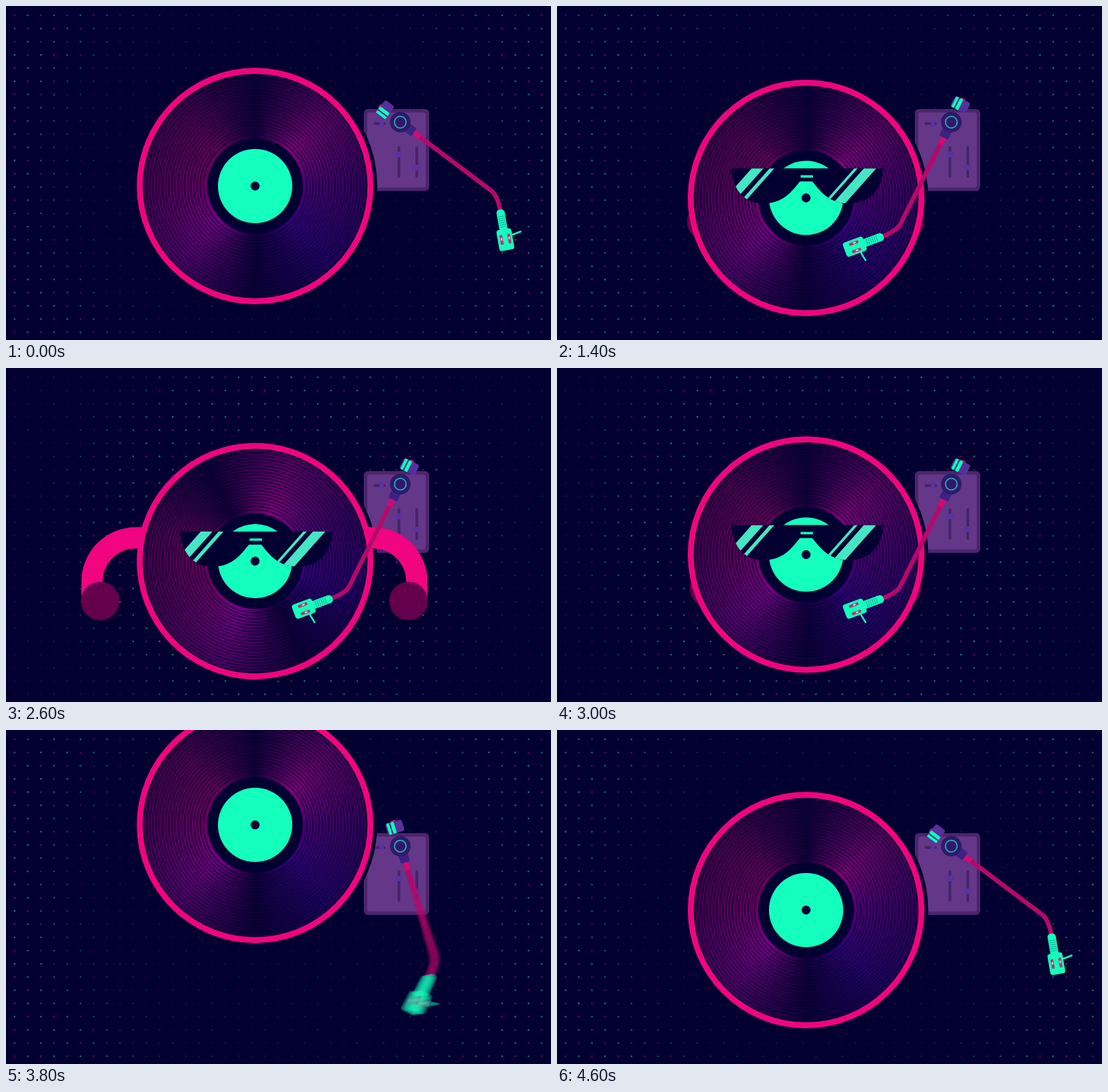
Animation of 792x486 px, one loop 4800 ms. Source, as an HTML page with a canvas:

```html
<!DOCTYPE html>
<html lang="en">
<head>
<meta charset="utf-8">
<title>Dancing record</title>
<style>
html, body { margin: 0; width: 100%; height: 100%; overflow: hidden; background: #020030; }
canvas { display: block; }
</style>
</head>
<body>
<canvas id="stage" width="792" height="486"></canvas>
<script>
const ctx = document.getElementById('stage').getContext('2d');
const LOOP = 4800, STEP = 200, RAD = Math.PI / 180;
const NAVY = '#020030', PINK = '#f0047f', TEAL = '#14ffbe', PALE = '#46e6c4';
const CX = 362, CY = 262;

const clamp = u => Math.min(1, Math.max(0, u));

// Goes from 0 to 1 between two times.
function ease(t, from, to) {
  const u = clamp((t - from) / (to - from));
  return u * u * (3 - 2 * u);
}

// Rises from 0 to 1 and falls back between two times.
function bump(t, from, to) {
  return Math.sin(Math.PI * clamp((t - from) / (to - from))) ** 2;
}

const nod = t => 6 * bump(t, 3200, 3600);
const spin = t => 360 * ease(t, 1350, 2850);
const reach = t => ease(t, 1100, 1600) - ease(t, 2800, 3300);
const ripple = t => 400 - 185 * bump(t, 1000, 4000);
const glassesY = t => -43 - 326 * (1 - ease(t, 600, 1000) + ease(t, 3600, 3800));

function recordY(t) {
  const dips = bump(t, 800, 1800) + bump(t, 1800, 3400) + bump(t, 3400, 3800);
  return CY + 19 * dips - 137 * bump(t, 3600, 4100) - nod(t);
}

function armAngle(t) {
  const swing = ease(t, 100, 800) - ease(t, 3400, 4150);
  return 37 + 79.5 * swing + 2.5 * bump(t, 500, 1100) + nod(t);
}

function disc(x, y, r, fill) {
  ctx.beginPath();
  ctx.arc(x, y, r, 0, 7);
  ctx.fillStyle = fill;
  ctx.fill();
}

function ring(r, color, width) {
  ctx.beginPath();
  ctx.arc(0, 0, r, 0, 7);
  stroke(color, width);
}

function box(x, y, w, h, r, fill) {
  ctx.beginPath();
  ctx.roundRect(x, y, w, h, r);
  ctx.fillStyle = fill;
  ctx.fill();
}

function stroke(color, width) {
  ctx.strokeStyle = color;
  ctx.lineWidth = width;
  ctx.stroke();
}

function placed(x, y, degrees, draw) {
  ctx.save();
  ctx.translate(x, y);
  ctx.rotate(degrees * RAD);
  draw();
  ctx.restore();
}

function drawDots(radius) {
  for (let row = 0; row < 25; row++) {
    for (let col = 0; col < 41; col++) {
      const x = 12.5 + col * 19.15, y = 13.5 + row * 19.22;
      const off = (Math.hypot(x - 396, y - 243) - radius) / 90;
      ctx.globalAlpha = 0.15 + 0.45 * Math.exp(-off * off);
      disc(x, y, 1.3, (row + col) % 2 ? '#3fb0b4' : '#b0167c');
    }
  }
  ctx.globalAlpha = 1;
}

function drawPanel() {
  const dark = '#482468', knob = '#5a32a0';
  box(520, 150, 95, 119, 6, '#4c246c');
  box(525, 155, 85, 109, 3, '#643788');
  box(534, 169, 18, 4, 2, dark);
  box(543, 166, 6, 10, 2, knob);
  for (const [x, y] of [[571, 216], [597, 235]]) {
    box(x - 2, 204, 4, 46, 2, dark);
    box(x - 5, y - 4, 10, 8, 3, knob);
  }
}

// Each arm is a quarter circle that tightens as the record dips.
function drawArms(bend, extent) {
  const mix = (a, b) => (a + (b - a) * bend) * extent;
  const x = mix(116, 172), y = mix(78, 49), r = mix(105, 64);
  for (const side of [-1, 1]) {
    ctx.save();
    ctx.translate(CX - 1, CY);
    ctx.scale(side, 1);
    ctx.beginPath();
    ctx.moveTo(100 * extent, y - r);
    ctx.arc(x, y, r, -Math.PI / 2, 0);
    ctx.lineTo(x + r, y + 22 * extent);
    stroke(PINK, 31);
    disc(mix(208.5, 224), mix(102, 77), 28, '#65004c');
    ctx.restore();
  }
}

function drawRecord(turn) {
  const shine = ctx.createConicGradient((turn - 90) * RAD, 0, 0);
  const shades = ['#100038', '#84007a', '#4a0070', '#300078', '#0e0038',
    '#780084', '#66005e', '#640056', '#100038'];
  shades.forEach((shade, i) => shine.addColorStop(i / (shades.length - 1), shade));
  const fade = ctx.createRadialGradient(0, 0, 80, 0, 0, 161);
  fade.addColorStop(0, 'rgba(2,0,48,0)');
  fade.addColorStop(1, 'rgba(2,0,48,.35)');
  disc(0, 0, 172, PINK);
  disc(0, 0, 163, NAVY);
  disc(0, 0, 161, shine);
  disc(0, 0, 161, fade);
  for (let r = 75; r < 163; r += 4.6) ring(r, 'rgba(4,0,44,.6)', 2.2);
  disc(0, 0, 69.5, NAVY);
  disc(0, 0, 54, TEAL);
  disc(0, 0, 6.5, NAVY);
}

function drawGlasses() {
  ctx.beginPath();
  ctx.moveTo(-109, 0);
  ctx.bezierCurveTo(-106, 32, -90, 51, -62, 51);
  ctx.bezierCurveTo(-34, 51, -22, 35, -9, 19);
  ctx.lineTo(9, 19);
  ctx.bezierCurveTo(22, 35, 34, 51, 62, 51);
  ctx.bezierCurveTo(92, 51, 110, 32, 112, 0);
  ctx.fillStyle = NAVY;
  ctx.fill();
  ctx.clip();
  // Slanted glints: left end at the top edge, width.
  for (const [x, w] of [[-79, 17], [-53, 7], [70, 5], [84, 18]]) {
    ctx.beginPath();
    ctx.moveTo(x, 0);
    ctx.lineTo(x + w, 0);
    ctx.lineTo(x + w - 40, 45);
    ctx.lineTo(x + w - 46, 52);
    ctx.lineTo(x - 46, 52);
    if (w < 10) ctx.lineTo(x - 38, 43);
    ctx.fillStyle = PALE;
    ctx.fill();
  }
  box(-8, 10, 18, 3.5, 0, TEAL);
}

function drawHead() {
  box(-1, -6, 33, 12, 5, TEAL);
  for (let x = 9; x < 27; x += 3) box(x, -5, 1, 10, 0, '#16a99c');
  ctx.beginPath();
  ctx.moveTo(38, -9);
  ctx.lineTo(37.5, -15);
  ctx.lineTo(35.5, -25);
  stroke(TEAL, 2.5);
  box(28, -11, 31, 22, 4, TEAL);
  for (const y of [-6, 5.5]) {
    box(36, y - 2, 14, 4, 1, '#b0356c');
    box(40, y - 1, 4, 2, 0, '#d7d9cf');
  }
}

function drawTube() {
  ctx.beginPath();
  ctx.moveTo(24, 0);
  ctx.lineTo(165, 0);
  ctx.quadraticCurveTo(177, 0, 193, 15);
  stroke('#b5096a', 6.5);
  placed(193, 15, 43, drawHead);
}

function drawPivot() {
  box(22, -4, 14, 8, 1, '#d40a72');
  box(10, -7, 15, 14, 2, '#3c2184');
  box(-39, -4, 5, 7, 1, '#b31b75');
  box(-37, -13, 17, 25, 3, '#57309c');
  box(-37, -1, 17, 11, 1, TEAL);
  box(-37, 4, 17, 2, 0, '#24347d');
  disc(0, 0, 15, '#2e1a6c');
  ring(8.5, '#2bb9b5', 1.6);
}

// A fast swing smears the tube over the arc it sweeps.
function drawTonearm(t) {
  const angle = armAngle(t), smear = armAngle(t + 14) - armAngle(t - 14);
  const copies = 1 + 2 * Math.round(Math.abs(smear) / 1.5);
  ctx.globalAlpha = Math.min(1, 2 / copies);
  for (let i = 0; i < copies; i++) {
    placed(573, 169, angle + smear * ((i + 0.5) / copies - 0.5), drawTube);
  }
  ctx.globalAlpha = 1;
  placed(573, 169, angle, drawPivot);
}

function render(t) {
  const y = recordY(t);
  ctx.fillStyle = NAVY;
  ctx.fillRect(0, 0, 792, 486);
  drawDots(ripple(t));
  drawPanel();
  disc(CX, y, 177.5, NAVY);
  drawArms(clamp((y - CY) / 19), reach(t));
  placed(CX, y, spin(t) + nod(t), () => drawRecord(0));
  placed(CX, y, nod(t), () => {
    ctx.translate(0, glassesY(t));
    drawGlasses();
  });
  drawTonearm(t);
}

function tick(now) {
  render(Math.floor(now % LOOP / STEP) * STEP);
  requestAnimationFrame(tick);
}
requestAnimationFrame(tick);
</script>
</body>
</html>
```
